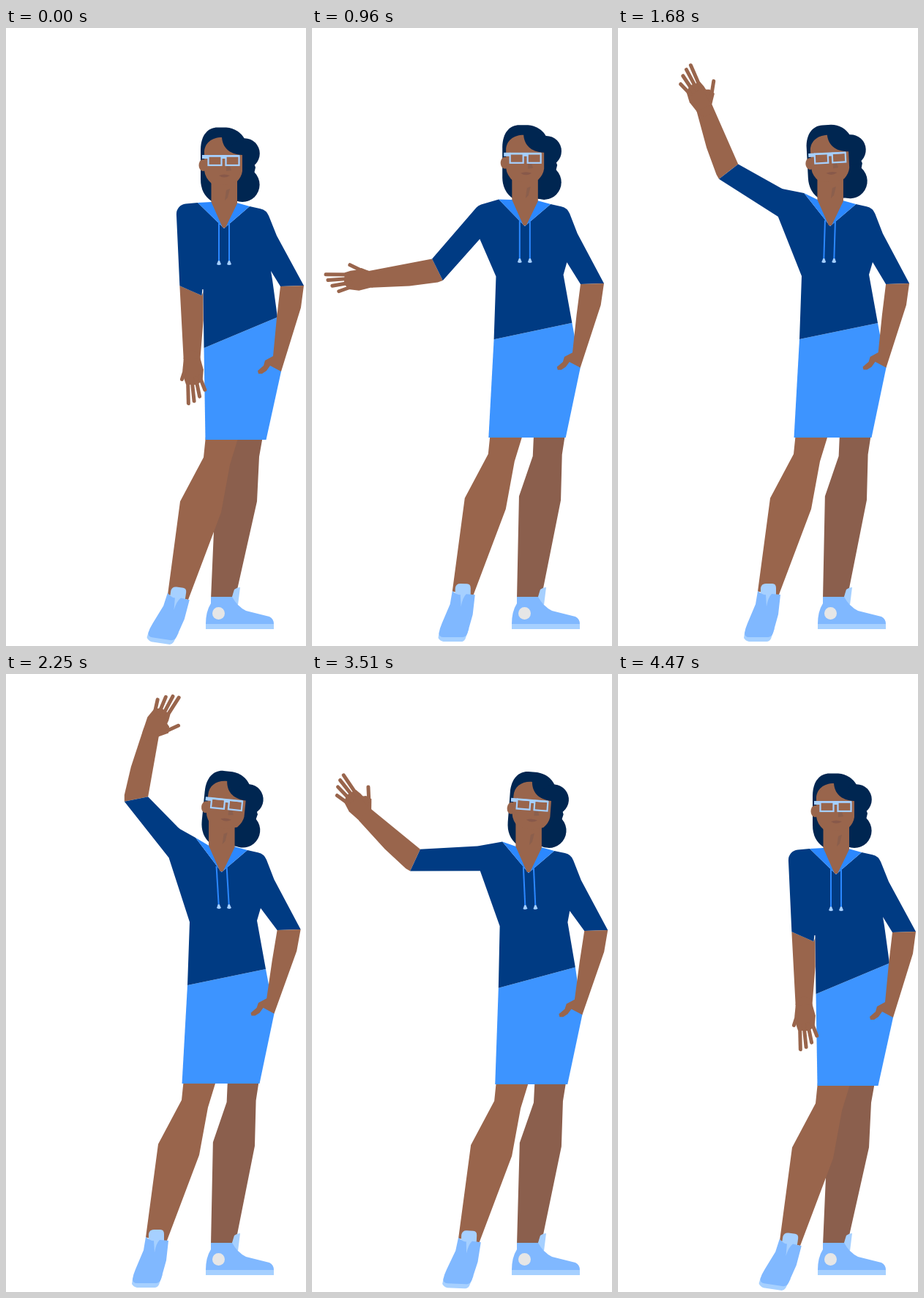
Animation, 410 px wide and 842 px high, one loop 4.5 s. Source, as an HTML page with a canvas:

```html
<!DOCTYPE html>
<html lang="en">
<head>
<meta charset="utf-8">
<title>Waving woman</title>
<style>
  html, body { margin: 0; width: 100%; height: 100%; overflow: hidden; background: #fff; }
  canvas { display: block; width: 410px; height: 842px; }
</style>
</head>
<body>
<canvas id="stage"></canvas>
<script>
const LOOP = 4500, W = 410, H = 842;
const SKIN = '#99654c', SHADE = '#8b5f4d', LIP = '#88594a', HAIR = '#002651', TOP = '#003b83',
      SKIRT = '#3d94ff', HOOD = '#2b88ff', SHOE = '#80b8ff', PALE = '#a6d0ff', DOT = '#e6e6e6';

// Waving runs from one right-hand extreme to another.
const WAVE_START = 1380, WAVE_END = 3180, WAVE_PERIOD = 900;

// Angles of upper arm, forearm and hand
const REST = [87, 89, 85], RIGHT = [231, 283, 300], LEFT = [206, 238, 224];
const UPPER_LEN = 104, FORE_LEN = 93;

const canvas = document.getElementById('stage');
const g = canvas.getContext('2d');
const ratio = window.devicePixelRatio || 1;
canvas.width = W * ratio;
canvas.height = H * ratio;

const clamp = (v, lo = 0, hi = 1) => Math.min(hi, Math.max(lo, v));
const mix = (a, b, p) => a + (b - a) * p;
const rad = deg => deg * Math.PI / 180;

function ease(from, to, t) {
  const p = clamp((t - from) / (to - from));
  return p * p * (3 - 2 * p);
}

// Rises over the first interval and falls over the second.
const hump = (t, a, b, c, d) => ease(a, b, t) - ease(c, d, t);

// Point at a distance along a direction and across it
function offset([x, y], deg, along, across = 0) {
  const c = Math.cos(rad(deg)), s = Math.sin(rad(deg));
  return [x + along * c - across * s, y + along * s + across * c];
}

function fill(color, path) {
  g.fillStyle = color;
  g.beginPath();
  path();
  g.fill();
}

const poly = (color, pts) => fill(color, () => pts.forEach(p => g.lineTo(...p)));
const disc = (color, x, y, rx, ry = rx) =>
  fill(color, () => g.ellipse(x, y, rx, ry, 0, 0, 2 * Math.PI));

function shape(color, d) {
  g.fillStyle = color;
  g.fill(new Path2D(d));
}

function line(color, width, cap, ...pts) {
  g.strokeStyle = color;
  g.lineWidth = width;
  g.lineCap = cap;
  g.beginPath();
  pts.forEach(p => g.lineTo(...p));
  g.stroke();
}

function at([x, y], deg, paint) {
  g.save();
  g.translate(x, y);
  g.rotate(rad(deg));
  paint();
  g.restore();
}

function frontShoe() {
  shape(PALE, 'M-11 3V-5Q-10-11-4-11H5Q10-11 10-5V12L-2 22Z');
  shape(PALE, 'M-33 56L-34 63Q-32 67-27 68L-3 68Q1 68 3 64L8 50Z');
  shape(SHOE, 'M-15-1Q-8 5-4 4L-3 20Q-1 8 4 3L16 4L13 31L6 56Q4 62-2 62H-27Q-33 62-33 56Q-32 50-29 43L-18 17Z');
}

function backShoe() {
  shape(PALE, 'M308 778L312 765Q316 762 320 762L317 786Z');
  shape(SHOE, 'M280 775H309Q316 788 328 794L360 802Q366 805 366 812H273Q273 795 280 784Z');
  g.fillStyle = PALE;
  g.fillRect(273, 812, 93, 7);
  disc(DOT, 290.5, 797.5, 8.5);
}

function hand(thumb) {
  disc(SKIN, 0, 0, 11.4);
  shape(SKIN, 'M0 11.4L14 14L26 13L34 11L36-4L30-12L16-14.5L0-11.4Z');
  for (let i = 0; i < 4; i++) {
    const tip = [60 - i * (1 + 1.5 * i), 10 - 8 * i];
    line(SKIN, 5, 'round', [28 - i, 8 - 5.5 * i], tip);
  }
  poly(SKIN, [[-2, 10], [11, thumb * .76], [19, thumb * .64], [23, 10]]);
  line(SKIN, 5, 'round', [12, thumb * .62], [26.5, thumb]);
}

function hairBack() {
  shape(HAIR, 'M266 166C266 145 277 135.5 289 135.5H301Q318 137 326 151L341 190L330 236H281Q266 226 266 206Z');
  disc(HAIR, 326, 171, 20.8);
  disc(HAIR, 323, 213.5, 23.6);
}

function face() {
  disc(SKIN, 269.5, 187, 6, 8);
  shape(SKIN, 'M271 194V170C271 157 281 149 295 149C296 162 304 172 323 173V195Q322 203 315 210L300 214L281 212Q272 204 271 194Z');
  shape(LIP, 'M291 201Q298 198 306 201Q298 206 291 201Z');
  shape(SHADE, 'M301 188H306L308 194L301 195Z');
  g.fillStyle = PALE;
  g.fillRect(268, 173, 9, 5);
  g.fillRect(276, 173, 43, 2.5);
  g.fillRect(294, 175, 7, 3);
  g.strokeStyle = PALE;
  g.lineWidth = 2.2;
  g.strokeRect(276.5, 174.5, 18, 12.5);
  g.strokeRect(300.5, 174.5, 18, 12.5);
}

function draw(t) {
  const shift = hump(t, 220, 1040, 3240, 3980);
  const raised = hump(t, 734, 1350, 3040, 4200);
  const bent = hump(t, 641, 1350, 3100, 4200);
  const phase = 2 * Math.PI * (clamp(t, WAVE_START, WAVE_END) - WAVE_START) / WAVE_PERIOD;
  const swing = Math.cos(phase);
  const settle = hump(t, 960, WAVE_START, WAVE_END, 4200);
  const sway = settle * (.22 + .78 * swing);
  const tilt = settle * 5.8 * swing;

  const [upper, fore, palm] = REST.map((a, i) =>
    mix(a, mix(LEFT[i], RIGHT[i], (1 + swing) / 2), i ? bent : raised));
  const lift = (upper - REST[0]) / (RIGHT[0] - REST[0]);

  // Where resting points go: chest and hip-side arm, back leg, free corners
  const chest = (x, y) => [
    x - shift * (7 + (y - 240) * .011) + 4 * sway * clamp((460 - y) / 110),
    y - shift * (3 + Math.max(0, y - 350) * .02)
  ];
  const backLeg = (x, y) => [x - shift * (778 - y) / 44, y - shift * (778 - y) / 70];
  const move = (x, y, dx, dy) => [x + dx * shift, y + dy * shift];
  const place = (map, ...pts) => pts.map(p => map(...p));

  g.setTransform(ratio, 0, 0, ratio, 0, 0);
  g.fillStyle = '#fff';
  g.fillRect(0, 0, W, H);

  // Legs
  poly(SHADE, place(backLeg, [308, 556], [351, 556], [346, 584], [343, 645],
    [316, 765], [309, 778], [280, 778], [286, 640], [306, 586]));
  backShoe();
  at(move(0, 0, -30, -4.5), 0, () =>
    shape(SKIN, 'M273 556L270 585L238 645L221 772L249 779L294 660L306 595L318 556Z'));
  at(move(235.5, 773, -29.5, -5), 8.5 * (1 - shift), frontShoe);

  const inHead = paint => at([293.5 - 6 * shift + 11 * sway, 173 - 3.3 * shift], tilt, () => {
    g.translate(-293.5, -173);
    paint();
  });
  inHead(hairBack);

  const hipL = move(270.5, 436, -22.5, -12), hipR = move(371, 394, -16, 8);
  poly(SKIRT, [hipL, hipR, chest(376, 468), move(355.5, 561, -9, -3), move(272.5, 561, -32, -3)]);

  // Waving arm
  const pivot = chest(247, 254);
  const elbow = offset(pivot, upper, UPPER_LEN);
  const wrist = offset(elbow, fore, FORE_LEN);
  const cuff = (upper + fore) / 2 + 92 + 24 * (1 - shift) ** 2;
  const cuffTop = offset(elbow, cuff, 16.5), cuffLow = offset(elbow, cuff, -16.5);
  poly(SKIN, [elbow, cuffTop, offset(wrist, fore, 0, 11.4), offset(wrist, fore, 0, -11.4),
    offset(elbow, fore, 41, -16.5), offset(elbow, fore, 2, -17), cuffLow]);
  at(wrist, palm, () => hand(16 + 12 * clamp(lift * 1.4)));

  // Top
  const shoulder = offset(pivot, upper, 50 * lift - 14, 14 + 6 * lift);
  const armpit = offset(pivot, upper, 14 + 89 * (1 - lift) ** 4, -16);
  const collarL = [chest(262, 238)[0], 238 - 15 * lift];
  const collarR = chest(333, 243), vee = chest(298, 273);
  const sleeveIn = chest(375, 352), sleeveOut = chest(407, 351);
  fill(TOP, () => {
    g.moveTo(...vee);
    g.lineTo(...collarL);
    g.arcTo(...shoulder, ...cuffTop, 14);
    [cuffTop, cuffLow, armpit, move(269.5, 356, -18.5, -18), hipL, hipR,
      move(364, 343, -21, -7), move(362, 331, -14, -12), sleeveIn, sleeveOut, chest(370, 283)
    ].forEach(p => g.lineTo(...p));
    g.arcTo(...chest(356, 248), ...collarR, 16);
    g.lineTo(...collarR);
  });

  // Hood, neck and strings, measured from the tip of the neckline
  poly(HOOD, [collarL, offset(vee, 0, -17, -36), offset(vee, 0, 17, -35), collarR, vee]);
  at(vee, 0, () => {
    shape(SKIN, 'M-17.5-75H18V-34L2-1H-2L-17.5-36Z');
    shape(SHADE, 'M3-52L8-54L5-42L1-38Z');
  });
  for (const dx of [-7, 7]) {
    at(offset(vee, 0, dx, -8), -.6 * tilt, () => {
      line(HOOD, 2, 'butt', [0, 0], [0, 53]);
      shape(PALE, 'M-1 52H1L3 57Q0 59-3 57Z');
    });
  }
  inHead(face);

  // Arm on the hip
  poly(SKIN, [sleeveIn, sleeveOut, ...place(chest, [403, 381], [376, 468], [361, 460], [356, 467],
    [350, 471], [345, 471], [344, 467], [352, 460], [354, 453], [365, 447], [370, 395])]);
}

const start = performance.now();
function tick() {
  draw((performance.now() - start) % LOOP);
  requestAnimationFrame(tick);
}
tick();
</script>
</body>
</html>
```
